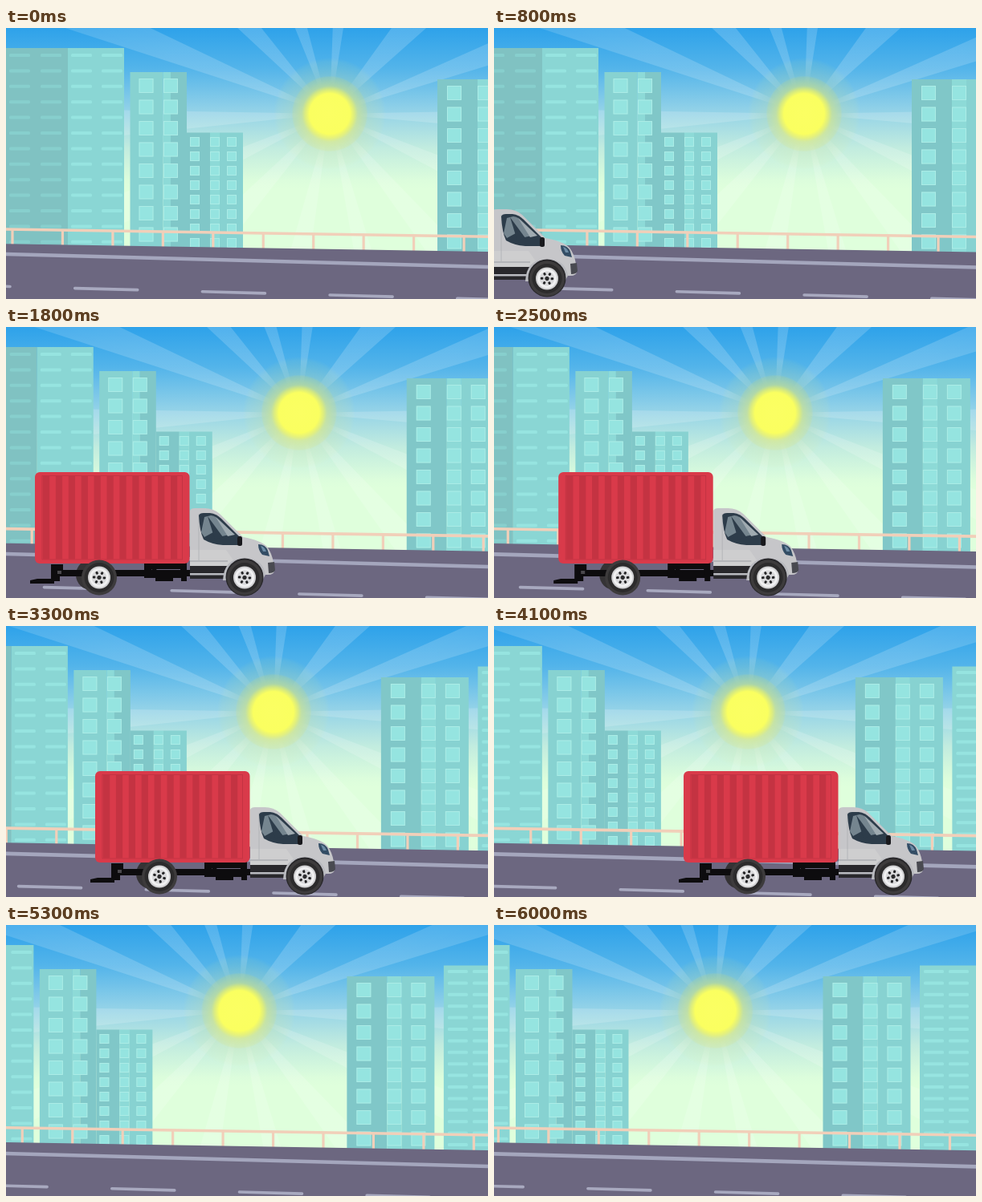
Write an HTML page with a canvas that moves like this. It is 600 by 338 pixels and loops after 6100 ms.

```html
<!DOCTYPE html>
<html lang="en">
<head>
<meta charset="utf-8">
<title>Delivery truck</title>
<style>
html, body { margin: 0; width: 100%; height: 100%; overflow: hidden; }
canvas { display: block; width: 600px; height: 338px; }
</style>
</head>
<body>
<canvas id="stage" width="600" height="338"></canvas>
<script>
const W = 600, H = 338, LOOP = 6100, STEP = 100;
const PAN = -0.02125; // px per ms
const ctx = document.getElementById('stage').getContext('2d');

// Truck position at known seconds: it slows down, crawls, then speeds away.
const KEYS = [[0.8, -195], [1.8, 36], [3.3, 111], [4.1, 236], [4.7, 474]];
const truckX = s => KEYS.reduce((sum, [ti, xi]) =>
  sum + KEYS.reduce((p, [tj]) => tj === ti ? p : p * (s - tj) / (ti - tj), xi), 0);

function rect(x, y, w, h, color) {
  ctx.fillStyle = color;
  ctx.fillRect(x, y, w, h);
}
function round(x, y, w, h, r, color) {
  ctx.beginPath();
  ctx.roundRect(x, y, w, h, r);
  ctx.fillStyle = color;
  ctx.fill();
}
function disc(x, y, r, color) {
  ctx.beginPath();
  ctx.arc(x, y, r, 0, Math.PI * 2);
  ctx.fillStyle = color;
  ctx.fill();
}
function shape(d, color) {
  ctx.fillStyle = color;
  ctx.fill(new Path2D(d));
}
function line(x1, y1, x2, y2, width, color, cap = 'butt') {
  ctx.beginPath();
  ctx.moveTo(x1, y1);
  ctx.lineTo(x2, y2);
  ctx.lineWidth = width;
  ctx.lineCap = cap;
  ctx.strokeStyle = color;
  ctx.stroke();
}
function fillStops(g, stops) {
  stops.forEach(([at, c]) => g.addColorStop(at, c));
  return g;
}

const sky = fillStops(ctx.createLinearGradient(0, 0, 0, 200), [
  [0, '#2ea2ea'], [0.25, '#53b4ea'], [0.5, '#8fd0e8'],
  [0.75, '#c2ecdf'], [0.95, '#dcfddc'], [1, '#dfffdc']
]);
const SUN = { x: 403, y: 107 };
// Ray edges in degrees clockwise from straight up.
const RAYS = [
  [-72, -64.4], [-47, -38.5], [-22, -14.7], [2, 9], [35.7, 48.3], [66, 73],
  [89, 95], [111, 118], [136, 145], [163, 170], [188, 196], [218, 227], [242, 249], [264, 271]
];
const rayFill = fillStops(ctx.createRadialGradient(0, 0, 36, 0, 0, 420), [
  [0, 'rgba(255,255,255,0)'], [0.07, 'rgba(255,255,255,.17)'],
  [0.45, 'rgba(255,255,255,.17)'], [1, 'rgba(255,255,255,.12)']
]);
const glow = fillStops(ctx.createRadialGradient(0, 0, 0, 0, 0, 70), [
  [0, '#fbff62'], [0.36, '#faff60'], [0.44, 'rgba(245,245,90,.72)'],
  [0.5, 'rgba(235,235,100,.48)'], [0.65, 'rgba(225,228,110,.3)'],
  [0.68, 'rgba(225,230,130,.17)'], [0.93, 'rgba(225,235,140,.07)'], [1, 'rgba(225,235,140,0)']
]);

function drawSun() {
  ctx.save();
  ctx.translate(SUN.x, SUN.y);
  for (const edges of RAYS) {
    ctx.beginPath();
    ctx.moveTo(0, 0);
    for (const deg of edges) {
      const a = deg * Math.PI / 180;
      ctx.lineTo(600 * Math.sin(a), -600 * Math.cos(a));
    }
    ctx.fillStyle = rayFill;
    ctx.fill();
  }
  disc(0, 0, 70, glow);
  ctx.restore();
}

const MID = '#87d2d1', DARK = '#80c7c8', LIGHT = '#8ddad7', PANE = '#95e4e0';

function tower(x, y, parts) {
  for (const [dx, w, color] of parts) rect(x + dx, y, w, 290 - y, color);
}
function panes(cols, y, gap, size) {
  for (; y < 270; y += gap) for (const x of cols) {
    rect(x, y, size, size, PANE);
    ctx.strokeStyle = 'rgba(190,244,236,.55)';
    ctx.lineWidth = 1;
    ctx.strokeRect(x + 0.5, y + 0.5, size - 1, size - 1);
  }
}
function slits(cols, y, gap, w, color) {
  for (; y < 275; y += gap) for (const x of cols) round(x, y - 2, w, 4, 1.5, color);
}

function drawCity() {
  tower(-10, 25, [[0, 87, '#80c2c2'], [87, 70, '#8ad6d4']]);
  slits([4, 43], 34, 19.4, 26, '#87cfcd');
  slits([81, 119], 34, 19.4, 26, '#96e4e0');

  tower(154.5, 55, [[0, 41, MID], [41, 9.5, LIGHT], [50.5, 20, DARK]]);
  panes([165.5, 196], 63, 26.5, 18);

  tower(225, 130.5, [[0, 29, DARK], [29, 12, LIGHT], [41, 29, MID]]);
  panes([229, 254, 275], 136, 18, 12);

  tower(537, 64, [[0, 50, DARK], [50, 18, LIGHT], [68, 41, MID]]);
  panes([549, 587, 617], 72, 26.5, 18);

  tower(657.5, 50.5, [[0, 110, '#8ad6d4']]);
  slits([662.5, 693.5], 58, 14.4, 25, '#96e4e0');
}

const roadTop = x => 269.2 + x * 0.0165;
const railTop = x => 251 + x * 0.0155;
function drawRoad() {
  const a = -40, b = 780, rail = '#f1cfb9';
  for (let x = 8; x < b; x += 62.45) line(x, railTop(x), x, roadTop(x) + 2, 3.2, rail);
  line(a, railTop(a), b, railTop(b), 3.6, rail);
  shape(`M${a} ${roadTop(a)}L${b} ${roadTop(b)}V360H${a}Z`, '#6c6780');
  line(a, 282 + a * 0.0267, b, 282 + b * 0.0267, 4.6, '#a4a6bd');
  for (let x = -73; x < b; x += 158.7) {
    line(x, 322.3 + x * 0.0267, x + 78, 322.3 + (x + 78) * 0.0267, 3.6, '#a8a9bf', 'round');
  }
}

function wheel(x, turn) {
  ctx.save();
  ctx.translate(x, 312.5);
  disc(0, 0, 22, '#3d3b3c');
  disc(0, 0, 18.5, '#2c2b2c');
  disc(0, 0, 14, '#d2d2d4');
  disc(0, 0, 12, '#f1f1f2');
  disc(0, 0, 9.3, '#d9d9db');
  ctx.rotate(turn);
  for (let i = 0; i < 6; i++) {
    ctx.rotate(Math.PI / 3);
    round(-1.5, -8.2, 3, 3.6, 1.2, '#242426');
  }
  disc(0, 0, 2.6, '#2b2b2d');
  ctx.restore();
}

function drawTruck(x) {
  ctx.save();
  ctx.translate(x, 0);
  const black = '#0d0c0e';

  // Chassis
  disc(70, 309, 19, '#353335');
  rect(30, 303, 215, 8, black);
  shape('M20 296H35V309H31V317H24V320H-6V316L3 314H20Z', black);
  rect(28, 304, 5, 4, '#4a484c');
  shape('M136 293H189V317H182V313H172V317H150V313H136ZM145 302V308H151ZM151 302L156 309H181V302Z', black);

  // Cargo box
  round(0, 181, 192.5, 114, 6, '#d93a4a');
  for (let i = 0; i < 11; i++) rect(10 + i * 15.9, 186, 8.2, 103.5, '#c43342');
  ctx.strokeStyle = '#bd3242';
  ctx.lineWidth = 0.8;
  ctx.strokeRect(9, 185.5, 174.5, 104.5);

  // Cab
  rect(193, 294, 48, 20, '#29282c');
  rect(193, 307, 46, 2.5, '#b9bac0');
  shape('M193 229Q194 226 199 226H211Q222 226 230 233L259 262Q281 266 289 274Q295 282 297 294L298 303Q298 309 290 309H284L240 307V298H193Z', '#c6c6c9');
  shape('M193 278H238L247 291L238 298H193Z', '#cececf');
  shape('M193 291H240V293H193Z', '#b4b5b9');
  line(204, 233, 204, 291, 0.8, '#aeb0b4');
  shape('M204 235Q205 232 210 232H218Q226 233 232 239L255 262V272H234Q220 271 210 265Q205 255 204 235Z', '#2d3c4a');
  shape('M211 237L219 235Q226 236 231 242L247 258L233 261L222 256L211 262L207 256Z', '#75858f');
  shape('M215 236L234 262L224 265Z', '#2d3c4a');
  shape('M225 237L249 259L240 261Z', '#a0abb1');
  round(252, 261, 6, 12, 2.5, '#19191d');
  shape('M278 271Q287 271 290 279L292 286L283 284Q278 279 278 271Z', '#334d65');
  shape('M281 273Q286 274 288 280L284 280Z', '#6d8ca5');
  shape('M290 294L298 293L299 303Q298 307 291 307Z', '#494a51');
  shape('M234 316Q235 288 262 288Q284 289 287 309L283 316Z', '#b9babf');
  disc(261, 312, 23.5, '#28272a');

  wheel(80, x / 22);
  wheel(261, x / 22);
  ctx.restore();
}

const begin = performance.now();
function frame(now) {
  const t = Math.floor(Math.max(0, now - begin) % LOOP / STEP) * STEP;
  rect(0, 0, W, H, sky);
  ctx.save();
  ctx.translate(t * PAN, 0);
  drawSun();
  drawCity();
  drawRoad();
  ctx.restore();
  drawTruck(truckX(t / 1000));
  requestAnimationFrame(frame);
}
frame(begin);
</script>
</body>
</html>
```
